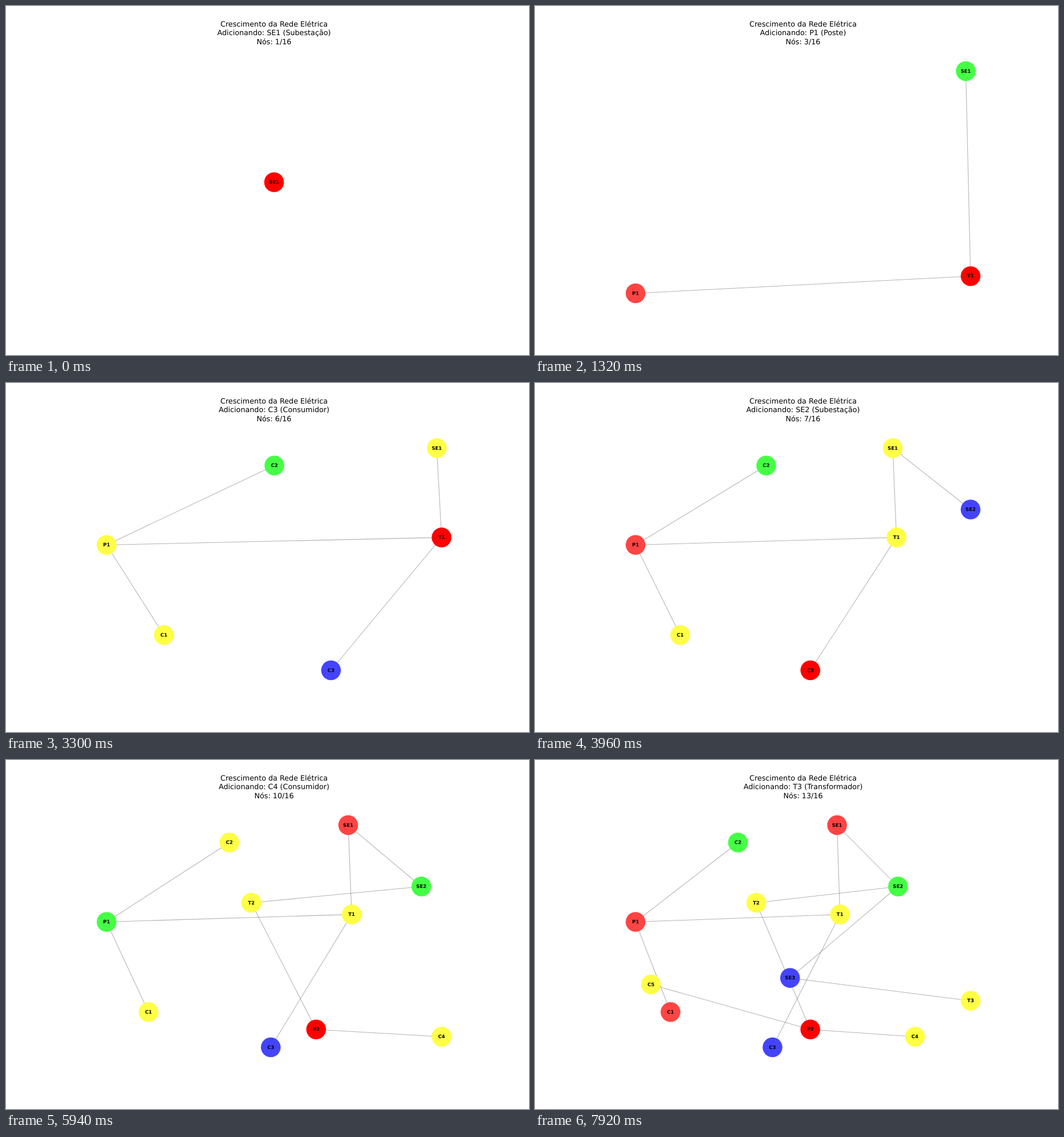
Animation, 917 px wide and 611 px high, one loop 8000 ms. Source, as an HTML page:

```html
<!DOCTYPE html>
<html lang="pt">
<head>
<meta charset="utf-8">
<title>Crescimento da Rede Elétrica</title>
<style>
  html, body { margin: 0; width: 100%; height: 100%; overflow: hidden; background: #fff; }
  svg { display: block; width: 917px; height: 611px; }
  text { font-family: "DejaVu Sans", sans-serif; text-anchor: middle; text-rendering: geometricPrecision; }
  .title { font-size: 12.74px; }
  .label { font-size: 8.49px; font-weight: bold; }
  line { stroke: #808080; stroke-opacity: .6; stroke-width: 1.06px; }
</style>
</head>
<body>
<svg viewBox="0 0 917 611">
  <text class="title" x="470" y="35.6">Crescimento da Rede Elétrica</text>
  <text class="title" x="470" y="51.2" id="adding"></text>
  <text class="title" x="470" y="66.8" id="count"></text>
  <g id="graph"></g>
</svg>
<script>
const STEP = 660, LOOP = 8000, TOTAL = 16, RADIUS = 17.3;
const LEFT = 176.3, RIGHT = 763.7, TOP = 114.1, BOTTOM = 503;

const kinds = { SE: 'Subestação', T: 'Transformador', P: 'Poste', C: 'Consumidor' };
const colors = { R: '#ff0000', r: '#ff4444', g: '#44ff44', b: '#4444ff', y: '#ffff44' };

// name, x, y, index of the node it connects to
const nodes = [
  ['SE1', 529.6, 114.1],
  ['T1', 534.7, 270.4, 0],
  ['P1', 176.3, 283.5, 1],
  ['C1', 237.6, 441.2, 2],
  ['C2', 355.8, 144.5, 2],
  ['C3', 416.4, 503, 1],
  ['SE2', 636.5, 221.5, 0],
  ['T2', 387.9, 250, 6],
  ['P2', 482.7, 471.7, 7],
  ['C4', 666.1, 484.5, 8],
  ['C5', 203.3, 393, 8],
  ['SE3', 447.2, 381.6, 6],
  ['T3', 763.7, 421.5, 11]
];

// node states at each step, in node order
const states = [
  'R', 'yR', 'gRr', 'yyrR', 'yRrbg', 'yRyygb', 'yyrygRb', 'ryyyyryR',
  'rbgyyrgyR', 'rygyybgyRy', 'ryyyrbgyRyy', 'ryyyrggyRbyb', 'ryrrgbgyRyyby'
];

const byId = id => document.getElementById(id);

// Stretches the present values over the plot area; a single value is centred.
function fit(values, from, to) {
  const min = Math.min(...values), span = Math.max(...values) - min;
  return values.map(v => span ? from + (v - min) / span * (to - from) : (from + to) / 2);
}

function draw(step) {
  const shown = nodes.slice(0, step + 1);
  const xs = fit(shown.map(n => n[1]), LEFT, RIGHT);
  const ys = fit(shown.map(n => n[2]), TOP, BOTTOM);
  let edges = '', discs = '', labels = '';
  shown.forEach(([name, , , parent], i) => {
    const x = xs[i], y = ys[i];
    if (parent !== undefined)
      edges += `<line x1="${xs[parent]}" y1="${ys[parent]}" x2="${x}" y2="${y}"/>`;
    discs += `<circle cx="${x}" cy="${y}" r="${RADIUS}" fill="${colors[states[step][i]]}"/>`;
    labels += `<text class="label" x="${x}" y="${y + 2.5}">${name}</text>`;
  });
  const name = nodes[step][0];
  byId('graph').innerHTML = edges + discs + labels;
  byId('adding').textContent = `Adicionando: ${name} (${kinds[name.replace(/\d/, '')]})`;
  byId('count').textContent = `Nós: ${step + 1}/${TOTAL}`;
}

const start = performance.now();
let current = 0;
draw(0);

function tick() {
  const step = Math.floor((performance.now() - start) % LOOP / STEP);
  if (step !== current) draw(current = step);
  requestAnimationFrame(tick);
}
requestAnimationFrame(tick);
</script>
</body>
</html>
```
